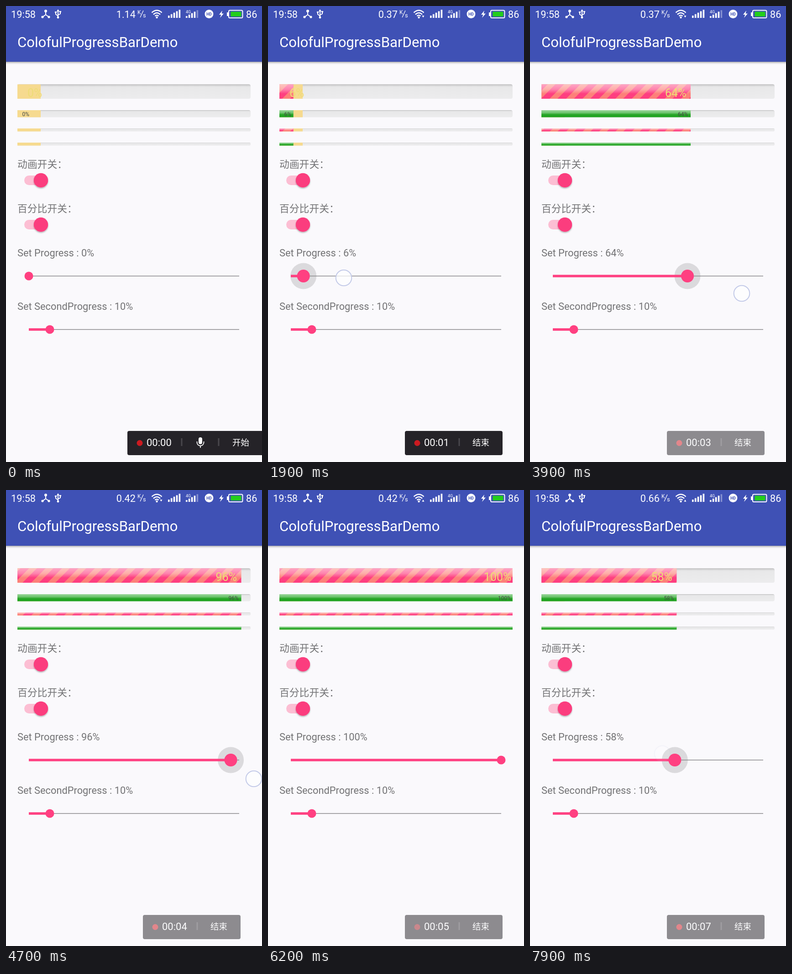
An HTML page that plays this animation: 561 by 998 pixels, repeating every 8000 ms.

```html
<!DOCTYPE html>
<html lang="zh-CN">
<head>
<meta charset="utf-8">
<title>Progress bar demo</title>
<style>
html, body { margin: 0; width: 100%; height: 100%; overflow: hidden; background: #faf9fc; }
svg { display: block; width: 100%; height: 100%; }
text { font-family: Roboto, "Noto Sans CJK SC", "Noto Sans CJK", sans-serif; white-space: pre; }
.label { font-size: 21.8px; fill: #737375; }
.status { font-size: 21.7px; fill: #fff; }
.white { fill: #fff; }
.line { fill: none; stroke: #fff; stroke-width: 2; }
.pink { fill: #ff4081; }
.rec { fill: #fff; }
</style>
</head>
<body>
<svg viewBox="0 0 561 998" preserveAspectRatio="none">
  <defs>
    <linearGradient id="shade" x2="0" y2="1">
      <stop stop-color="#000" stop-opacity=".34"/>
      <stop offset=".4" stop-color="#000" stop-opacity=".12"/>
      <stop offset="1" stop-color="#000" stop-opacity="0"/>
    </linearGradient>
    <linearGradient id="track" x2="0" y2="1">
      <stop stop-color="#b4b4b5"/>
      <stop offset=".09" stop-color="#dadadb"/>
      <stop offset=".2" stop-color="#e8e8e9"/>
      <stop offset="1" stop-color="#ececed"/>
    </linearGradient>
    <linearGradient id="gloss" x2="0" y2="1">
      <stop stop-color="#fff" stop-opacity=".54"/>
      <stop offset=".35" stop-color="#fff" stop-opacity=".36"/>
      <stop offset=".65" stop-color="#fff" stop-opacity="0"/>
    </linearGradient>
    <pattern id="stripes" width="36" height="40" patternUnits="userSpaceOnUse">
      <rect width="36" height="40" fill="#fe3f80"/>
      <rect width="17" height="40" fill="#fd8079"/>
    </pattern>
    <filter id="soft" x="-30%" y="-30%" width="160%" height="170%">
      <feDropShadow dx="0" dy="2" stdDeviation="1.6" flood-opacity=".3"/>
    </filter>
    <g id="switch">
      <rect x="40" y="-10.5" width="48" height="21" rx="10.5" fill="#fcbed3"/>
      <circle cx="76.5" r="15.7" fill="#fb3c7e" filter="url(#soft)"/>
    </g>
  </defs>

  <rect width="561" height="998" fill="#faf9fc"/>
  <rect y="122" width="561" height="6" fill="url(#shade)"/>
  <rect width="561" height="122" fill="#3f51b5"/>

  <g id="statusbar">
    <text class="status" x="11" y="25.6">19:58</text>
    <path class="line" d="M87 12V19L80 24M87 19L94 24"/>
    <g class="white">
      <circle cx="87" cy="11" r="3"/><circle cx="80" cy="24" r="2.6"/><circle cx="94" cy="24" r="2.6"/>
    </g>
    <path class="line" stroke-width="1.6" d="M114 11V25M109 14V18L114 22M119 13V17L114 20"/>
    <path class="white" d="M114 7l3 5h-6zM107 12h4v3h-4zM117 11h4v3h-4z"/>
    <circle class="white" cx="114" cy="25" r="2.4"/>
    <text class="status" id="speed" x="284" y="25.6" text-anchor="end"></text>
    <text class="white" x="288" y="18" font-size="12">K</text>
    <path class="line" style="stroke-width:1.3" d="M301 10L294 25"/>
    <text class="white" x="300" y="25" font-size="13">s</text>
    <path class="line" style="stroke-width:2.4" d="M319.500 14.500Q330.500 4.500 341.500 14.500M323 18.500Q330.500 11.500 338 18.500M326.500 22Q330.500 18.500 334.500 22"/>
    <circle class="white" cx="330.500" cy="25" r="2.2"/>
    <path class="white" id="arrow" d="M337.500 21h5l-2.500 4.500z"/>
    <g class="white" id="signal"></g>
    <text class="white" x="394" y="15.500" font-size="9">4G</text>
    <circle class="white" cx="445" cy="17.500" r="9.500"/>
    <text x="445" y="21" font-size="8.500" font-weight="700" fill="#3f51b5" text-anchor="middle">HD</text>
    <path class="white" d="M474 10L467 19h4.500L469 26L477 16.500h-4.500z"/>
    <rect class="line" x="488" y="9.500" width="30.500" height="16.500" rx="2.500"/>
    <rect class="white" x="484" y="14" width="3.500" height="8"/>
    <rect x="492.500" y="12.500" width="23" height="10.500" fill="#23cd1c"/>
    <text class="status" x="526" y="25.6">86</text>
  </g>
  <text class="white" x="25" y="90" font-size="31.1">ColofulProgressBarDemo</text>

  <g id="bars"></g>
  <text id="bigPct" y="198.500" font-size="25" fill="#eedc76"></text>
  <text id="smallPct" y="241" font-size="12" fill="#454a45"></text>

  <text class="label" x="25" y="354">动画开关：</text>
  <use href="#switch" y="381.500"/>
  <text class="label" x="25" y="450.500">百分比开关：</text>
  <use href="#switch" y="478.500"/>

  <text class="label" id="progressLabel" x="25" y="547.500"></text>
  <circle id="halo" cy="591" fill="#000" fill-opacity=".125"/>
  <path d="M50 591H511M50 708H511" stroke="#8b8a8d" stroke-width="1.5"/>
  <rect class="pink" id="seek" x="50" y="588.300" height="5.400"/>
  <circle class="pink" id="thumb" cy="591"/>
  <text class="label" x="25" y="664.500">Set SecondProgress : 10%</text>
  <rect class="pink" x="50" y="705.300" width="46" height="5.400"/>
  <circle class="pink" cx="96" cy="708" r="9.500"/>

  <g id="recorder">
    <rect id="panel" y="930" height="53" rx="4" fill="#252328"/>
    <g id="controls">
      <circle id="dot" cx="27" cy="956.500" r="6.500" fill="#cc1a20"/>
      <text class="rec" id="clock" x="42" y="963" font-size="22"></text>
      <rect x="117.500" y="946" width="3" height="17" fill="#49474c"/>
      <text class="rec" id="stop" x="148" y="962" font-size="18.500">结束</text>
      <g id="ready">
        <rect class="white" x="156" y="944" width="8" height="15" rx="4"/>
        <path class="line" style="stroke-width:1.8" d="M152.500 953v2a7.500 7.500 0 0 0 15 0v-2M160 962.500V967"/>
        <rect x="198.500" y="946" width="3" height="17" fill="#49474c"/>
        <text class="rec" x="230" y="962" font-size="18.500">开始</text>
      </g>
    </g>
  </g>

  <circle id="touch" r="17.300" fill="#fff" fill-opacity=".72" stroke="#c3cae8" stroke-width="2"/>
</svg>
<script>
const LOOP = 8000, STEP = 100;
const LEFT = 25, WIDTH = 511;
const $ = id => document.getElementById(id);
const set = (el, attrs) => {
  for (const key in attrs) el.setAttribute(key, attrs[key]);
};

// Tracks hold [time, ...values]; values run linearly between the entries.
const progress = [[1700, 0], [1900, 6], [2800, 26], [3900, 64], [4800, 100], [6900, 100], [7200, 80], [7900, 58]];
const press = [[1500, 0], [1700, 1], [5800, 1], [6000, 0], [6800, 0], [7000, 1]];
const touch = [
  [100, 514, 956, 0], [200, 514, 956, 1], [400, 514, 956, 1], [500, 514, 956, 0],
  [600, 20, 590, 0], [700, 20, 590, 1], [1050, 78, 592, 1], [1900, 166, 595, 1],
  [2800, 310, 615, 1], [3900, 464, 629, 1], [4700, 543, 632, 1], [5200, 546, 632, 0],
  [6300, 508, 588, 0], [6450, 505, 587, 1], [6800, 453, 584, 1], [7500, 290, 577, 1], [7950, 290, 577, 0]
];
const panelAlpha = [[3400, 1], [3600, .51]];
const dotAlpha = [[5000, 1], [5600, .65], [6800, .8], [7200, 1]];
const speeds = [[0, '1.14'], [1200, '0.37'], [4200, '0.42'], [7500, '0.66']];
const START = 500;

function at(track, t) {
  const next = track.findIndex(k => k[0] > t);
  if (next < 0) return track[track.length - 1].slice(1);
  if (next === 0) return track[0].slice(1);
  const a = track[next - 1], b = track[next];
  const f = (t - a[0]) / (b[0] - a[0]);
  return a.slice(1).map((v, i) => v + (b[i + 1] - v) * f);
}

const bars = [[171.5, 31.5, 'url(#stripes)'], [228, 15.5, '#22a422'], [268, 6.5, 'url(#stripes)'], [299, 6.5, '#22a422']];
$('bars').innerHTML = bars.map(([y, h, fill]) => {
  const box = `x="${LEFT}" y="${y}" height="${h}"`;
  return `<rect ${box} width="${WIDTH}" rx="${Math.min(4, h / 3)}" fill="url(#track)"/>
    <rect ${box} width="51" fill="#f6da8f"/>
    <rect class="fill" ${box} fill="${fill}"/>
    <rect class="fill" ${box} fill="url(#gloss)"/>`;
}).join('');
const fills = document.querySelectorAll('.fill');

$('signal').innerHTML = [355, 394].map(x => [0, 1, 2, 3, 4].map(i => {
  const h = (x === 355 ? 5 : 4) + i * 3.2;
  const dim = x === 394 && i === 4 ? .35 : 1;
  return `<rect x="${x + i * 5.9}" y="${26 - h}" width="3.6" height="${h}" opacity="${dim}"/>`;
}).join('')).join('');

function draw(t) {
  const pct = Math.round(at(progress, t)[0]);
  const end = LEFT + WIDTH * pct / 100;
  const knob = 50 + 4.61 * pct;
  const [p] = at(press, t);

  fills.forEach(el => el.setAttribute('width', end - LEFT));
  set($('stripes'), { patternTransform: `translate(${LEFT + t * .06 % 36} 203) skewX(-45)` });
  $('bigPct').textContent = $('smallPct').textContent = pct + '%';
  set($('bigPct'), { x: Math.max(47, end - (pct === 100 ? 63 : 56)) });
  set($('smallPct'), { x: Math.max(35.5, end - (pct === 100 ? 32 : 28)) });
  $('progressLabel').textContent = `Set Progress : ${pct}%`;
  set($('seek'), { width: knob - 50 });
  set($('thumb'), { cx: knob, r: 9.5 + 4.5 * p });
  set($('halo'), { cx: knob, r: 28.5 * p });

  const [x, y, alpha] = at(touch, t);
  set($('touch'), { cx: x, cy: y, opacity: alpha });

  const running = t >= START;
  const secs = Math.max(0, Math.floor((t - START) / 1000));
  set($('panel'), running ? { x: 300, width: 214 } : { x: 266, width: 299 });
  set($('controls'), { transform: `translate(${running ? 300 : 266})` });
  set($('recorder'), { opacity: at(panelAlpha, t)[0] });
  set($('dot'), { opacity: at(dotAlpha, t)[0] });
  $('clock').textContent = '00:0' + secs;
  $('stop').style.display = running ? '' : 'none';
  $('ready').style.display = running ? 'none' : '';

  $('speed').textContent = speeds.filter(s => s[0] <= t).pop()[1];
  set($('arrow'), {
    opacity: t < 1200 ? 0 : 1,
    transform: t < 6200 ? '' : 'rotate(180 340 23.2)'
  });
}

const begin = performance.now();
function tick() {
  const t = (performance.now() - begin) % LOOP;
  draw(Math.floor(t / STEP) * STEP);
  requestAnimationFrame(tick);
}
tick();
</script>
</body>
</html>
```
